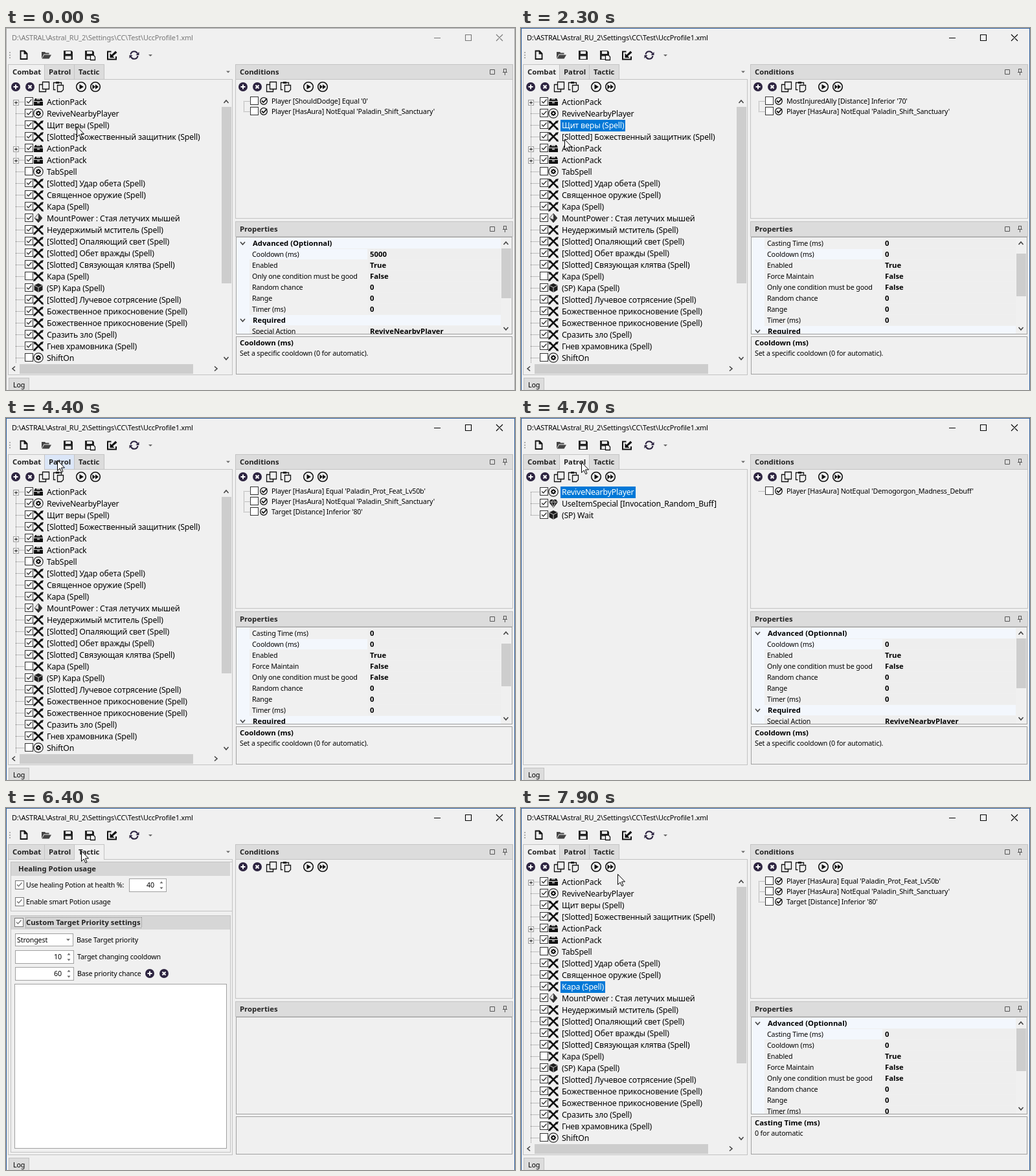
An HTML page with a canvas that plays this animation: 786 px wide and 560 px high, repeating every 8000 ms.

```html
<!DOCTYPE html>
<html lang="ru">
<head>
<meta charset="utf-8">
<title>Profile editor</title>
<style>
  html, body { margin: 0; width: 100%; height: 100%; overflow: hidden; background: #f0f0f0; }
  canvas { display: block; }
</style>
</head>
<body>
<canvas id="stage" width="786" height="560"></canvas>
<script>
const ctx = document.getElementById('stage').getContext('2d');
const BG = '#f0f0f0', BAR = '#dcdcdc', LINE = '#c3c3c3', EDGE = '#a0a0a0', INK = '#111', PLUM = '#2d2440';
const FAMILY = '"Noto Sans", "Open Sans", sans-serif';
const FONTS = {
  small: [`10.7px ${FAMILY}`, '-0.16px'],
  title: [`10.9px ${FAMILY}`, '-0.16px'],
  tree: [`12.3px ${FAMILY}`, '-0.17px'],
  bold: [`bold 11.3px ${FAMILY}`, '0px']
};

// First letter: row icon; a capital means unchecked.
const COMBAT = [
  'p ActionPack', 'g ReviveNearbyPlayer', 's Щит веры (Spell)',
  's [Slotted] Божественный защитник (Spell)', 'p ActionPack', 'p ActionPack', 'G TabSpell',
  's [Slotted] Удар обета (Spell)', 's Священное оружие (Spell)', 's Кара (Spell)',
  'm MountPower : Стая летучих мышей', 's Неудержимый мститель (Spell)',
  's [Slotted] Опаляющий свет (Spell)', 's [Slotted] Обет вражды (Spell)',
  's [Slotted] Связующая клятва (Spell)', 'S Кара (Spell)', 'c (SP) Кара (Spell)',
  's [Slotted] Лучевое сотрясение (Spell)', 's Божественное прикосновение (Spell)',
  's Божественное прикосновение (Spell)', 's Сразить зло (Spell)',
  's Гнев храмовника (Spell)', 'G ShiftOn'
];
const PATROL = ['g ReviveNearbyPlayer', 'd UseItemSpecial [Invocation_Random_Buff]', 'c (SP) Wait'];

const SANCTUARY = "Player [HasAura] NotEqual 'Paladin_Shift_Sanctuary'";
const CONDS = {
  revive: ["Player [ShouldDodge] Equal '0'", SANCTUARY],
  shield: ["MostInjuredAlly [Distance] Inferior '70'", SANCTUARY],
  smite: ["Player [HasAura] Equal 'Paladin_Prot_Feat_Lv50b'", SANCTUARY, "Target [Distance] Inferior '80'"],
  patrol: ["Player [HasAura] NotEqual 'Demogorgon_Madness_Debuff'"]
};

const actionProps = cooldown => [
  ['Advanced (Optionnal)'], ['Cooldown (ms)', cooldown], ['Enabled', 'True'],
  ['Only one condition must be good', 'False'], ['Random chance', '0'], ['Range', '0'],
  ['Timer (ms)', '0'], ['Required'], ['Special Action', 'ReviveNearbyPlayer']
];
const SPELL_PROPS = [
  ['Advanced (Optionnal)'], ['Casting Time (ms)', '0'], ['Cooldown (ms)', '0'], ['Enabled', 'True'],
  ['Force Maintain', 'False'], ['Only one condition must be good', 'False'], ['Random chance', '0'],
  ['Range', '0'], ['Timer (ms)', '0'], ['Required']
];
const COOLDOWN_HELP = ['Cooldown (ms)', 'Set a specific cooldown (0 for automatic).'];
const CASTING_HELP = ['Casting Time (ms)', '0 for automatic'];

const TABS = [['Combat', 4, 56], ['Patrol', 60, 46], ['Tactic', 106, 46]];

// Pointer moves: start ms, end ms, x, y
const MOVES = [
  [500, 600, 108, 152], [900, 1400, 67, 148], [2100, 2800, 69, 270], [3000, 3100, 69, 269],
  [3600, 4400, 79, 65], [4500, 5000, 120, 74], [5100, 5300, 124, 69], [6300, 6400, 116, 66],
  [6400, 7200, 24, 66], [7400, 7600, 28, 64], [7700, 7900, 149, 102]
];

function rect(x, y, w, h, color) {
  ctx.fillStyle = color;
  ctx.fillRect(x, y, w, h);
}
function box(x, y, w, h, fill, edge) {
  rect(x, y, w, h, edge);
  rect(x + 1, y + 1, w - 2, h - 2, fill);
}
function text(str, x, y, font = 'small', color = '#000', align = 'left') {
  [ctx.font, ctx.letterSpacing] = FONTS[font];
  ctx.fillStyle = color;
  ctx.textAlign = align;
  ctx.fillText(str, x, y);
}
function draw(d, x, y, fill, stroke, width = 1) {
  const path = new Path2D(d);
  ctx.save();
  ctx.translate(x, y);
  if (fill) { ctx.fillStyle = fill; ctx.fill(path); }
  if (stroke) { ctx.strokeStyle = stroke; ctx.lineWidth = width; ctx.stroke(path); }
  ctx.restore();
}
const ring = r => `M${-r} 0a${r} ${r} 0 1 0 ${2 * r} 0a${r} ${r} 0 1 0 ${-2 * r} 0Z`;
function dots(x, y, length, down) {
  for (let i = 0; i < length; i += 2) rect(down ? x : x + i, down ? y + i : y, 1, 1, '#888');
}
function clip(x, y, w, h, paint) {
  ctx.save();
  ctx.beginPath();
  ctx.rect(x, y, w, h);
  ctx.clip();
  paint();
  ctx.restore();
}

function checkbox(x, y, on, edge = '#333', size = 13) {
  box(x, y, size, size, '#fff', edge);
  if (on) draw('M3 6.5L5.5 9L10.5 3.5', x, y, null, edge, 1.4);
}
function badge(x, y, mark) {
  draw(ring(7), x, y, PLUM);
  draw(mark, x, y, null, '#fff', 2);
}
const addBadge = (x, y) => badge(x, y, 'M-3.5 0H3.5M0-3.5V3.5');
const removeBadge = (x, y) => badge(x, y, 'M-2.5-2.5L2.5 2.5M2.5-2.5L-2.5 2.5');

function listTools(x) {
  const y = 91;
  addBadge(x, y);
  removeBadge(x + 22, y);
  draw('M-2.5-7.5H7.5V3.5H-2.5ZM-2.5-3.5H-7.5V7.5H2.5V3.5', x + 44, y, null, INK, 1.3);
  draw('M-4.5 4.5H-7.5V-6.5H4.5V-3.5M-1.5-2.5H7.5V4.5L4.5 7.5H-1.5Z', x + 66, y, null, INK, 1.3);
  draw('M-4-8H1V-5H-4Z', x + 66, y, INK);
  draw(ring(7.3), x + 101, y, null, INK, 1.6);
  draw('M-2.5-4L4 0L-2.5 4Z', x + 101, y, INK);
  draw(ring(7.3), x + 123, y, null, INK, 1.6);
  draw('M-4.5-3.8L0 0L-4.5 3.8ZM0-3.8L5 0L0 3.8Z', x + 123, y, INK);
}

const ROW_ICONS = {
  p(x, y) {
    draw('M-5-5H5L7-1H-7ZM-7 0H7V6H-7Z', x, y, INK);
    draw('M-3-4H3M-2 1.5H2', x, y, null, '#ddd', 1.3);
  },
  g(x, y) {
    draw(ring(7.2), x, y, '#fafafa', '#222', 1.2);
    draw('M-4 0H4M0-4V4M-2.8-2.8L2.8 2.8M2.8-2.8L-2.8 2.8', x, y, null, INK, 1.8);
    draw(ring(2.2), x, y, '#fff', INK, 1.5);
  },
  s(x, y) {
    draw('M-5-5L6 6M5-5L-6 6', x, y, null, INK, 2.6);
    draw('M-8-7L-3-6L-6-2ZM8-7L3-6L6-2ZM4 7L7 4L8 8ZM-4 7L-7 4L-8 8Z', x, y, INK);
  },
  m(x, y) {
    draw('M0-7L6 0L0 7L-6 0Z', x, y, '#ddd', '#555');
    draw('M0-7L6 0L0 7ZM-6 0L0 2V7Z', x, y, '#333');
  },
  c(x, y) {
    draw('M0-7L6.5-4V3.5L0 7L-6.5 3.5V-4Z', x, y, '#1d1d1d');
    draw('M-6.5-4L0-.5L6.5-4M0-.5V7', x, y, null, '#ccc', 1);
  },
  d(x, y) {
    draw('M-4-6H4L7-2L0 7L-7-2Z', x, y, '#222');
    draw('M-7-2H7M-3-2L0 6L3-2L0-6Z', x, y, null, '#ccc', .9);
  }
};

const ARROWS = { up: 'M-3.5 2L0-2L3.5 2', down: 'M-3.5-2L0 2L3.5-2', left: 'M2-3.5L-2 0L2 3.5', right: 'M-2-3.5L2 0L-2 3.5' };
const arrow = (dir, x, y) => draw(ARROWS[dir], x, y, null, '#444', 1.6);
const caret = (x, y) => draw('M-3-1.5H3L0 1.5Z', x, y, '#666');

function tree(rows, selected, scrolls) {
  dots(15, 115, 18 * (rows.length - 1) + (scrolls ? 8 : 0), true);
  rows.forEach((row, i) => {
    const y = 114 + 18 * i, kind = row[0].toLowerCase(), label = row.slice(2);
    dots(15, y, 14);
    if (kind === 'p') {
      box(11, y - 3, 9, 9, '#fff', '#999');
      draw('M2 4.5H7M4.5 2V7', 11, y - 3, null, '#222');
    }
    checkbox(29, y - 7, row[0] === kind);
    ROW_ICONS[kind](50, y);
    if (i === selected) {
      [ctx.font, ctx.letterSpacing] = FONTS.tree;
      rect(61, y - 8, Math.round(ctx.measureText(label).width) + 4, 18, '#0078d7');
    }
    text(label, 63, y + 5, 'tree', i === selected ? '#fff' : '#000');
  });
  if (!scrolls) return;
  rect(4, 519, 345, 17, BG);
  rect(333, 122, 15, 273, '#cdcdcd');
  rect(21, 520, 268, 15, '#cdcdcd');
  arrow('up', 340, 114);
  arrow('down', 340, 511);
  arrow('left', 12, 527);
  arrow('right', 324, 527);
}

function spinner(x, y, w, value) {
  box(x, y, w, 21, '#fff', EDGE);
  text(value, x + w - 19, y + 14, 'small', '#000', 'right');
  draw('M-2.5 1.5H2.5L0-1.5Z', x + w - 8, y + 6, '#666');
  draw('M-2.5-1.5H2.5L0 1.5Z', x + w - 8, y + 15, '#666');
}

function tacticPage() {
  box(7, 83, 343, 77, BG, LINE);
  rect(8, 84, 338, 21, '#d6d6d6');
  text('Healing Potion usage', 19, 98, 'bold', '#222');
  checkbox(14, 112, true, '#777', 14);
  text('Use healing Potion at health %:', 31, 123);
  spinner(190, 109, 58, '40');
  checkbox(14, 138, true, '#777', 14);
  text('Enable smart Potion usage', 31, 149);

  box(7, 166, 340, 367, BG, LINE);
  rect(8, 167, 338, 21, '#d6d6d6');
  checkbox(13, 170, true, '#777', 14);
  text('Custom Target Priority settings', 31, 181, 'bold', '#222');
  dots(30, 169, 180);
  dots(30, 185, 180);
  dots(30, 169, 16, true);
  dots(209, 169, 16, true);
  box(14, 194, 90, 20, '#fff', EDGE);
  text('Strongest', 17, 208);
  caret(96, 204);
  text('Base Target priority', 109, 208);
  spinner(14, 220, 91, '10');
  text('Target changing cooldown', 110, 234);
  spinner(14, 246, 91, '60');
  text('Base priority chance', 110, 260);
  addBadge(222, 256);
  removeBadge(244, 256);
  box(13, 272, 328, 255, '#fff', EDGE);
}

function frameBar(active) {
  const edge = active ? '#2f5f9e' : '#aaa';
  rect(0, 0, 786, 1, edge);
  rect(0, 0, 1, 560, edge);
  rect(785, 0, 1, 560, edge);
  text('D:\\ASTRAL\\Astral_RU_2\\Settings\\CC\\Test\\UccProfile1.xml', 9, 19, 'title', active ? '#000' : '#777');
  draw('M661 15.5H671M709.5 10.5H718.5V19.5H709.5ZM757 10L767 20M767 10L757 20', 0, 0, null, active ? '#000' : '#777', 1.1);
}

function toolbar() {
  for (let y = 37; y < 49; y += 4) rect(5, y, 2, 2, '#aaa');
  draw('M-4.5-6H1.5L5.5-2V6.5H-4.5ZM1.5-6V-2H5.5', 27, 41.5, null, INK, 1.8);
  draw('M-7-5H-2L-.5-3.5H4.5V-1.5H-3.5L-7 5ZM-3-.5H8L4.5 5.5H-6.5Z', 62, 42, '#444');
  for (const x of [96, 129]) {
    draw('M-7-7H5L7-5V7H-7Z', x, 42, '#222');
    draw('M-4-6H4V-2H-4ZM-4.5 1.5H4.5V6H-4.5Z', x, 42, BG);
  }
  draw('M1.5 0H6L8.5 2.5V7.5H1.5Z', 129, 42, '#fff', INK, 1.3);
  draw('M-1-5.5H-6.5V6.5H6.5V2', 163.5, 42, null, INK, 2);
  draw('M-3-3V4H4L1.5 1.5L8-4L5.5-6.5L-.5-.5Z', 163.5, 42, INK);
  draw('M-5.5-1A5.5 5.5 0 0 1 5-2.5M5.5 1A5.5 5.5 0 0 1-5 2.5', 198, 42, null, PLUM, 2);
  draw('M7.5-5V0H2.5ZM-7.5 5V0H-2.5Z', 198, 42, PLUM);
  caret(223, 42.5);
}

function leftPane(s) {
  box(3, 79, 347, 458, BG, LINE);
  TABS.forEach(([name, x, w], i) => {
    const active = i === s.tab;
    const hover = !active && s.x >= x && s.x < x + w && s.y >= 57 && s.y < 79;
    box(x - 1, 56, w + 1, 24, active ? BG : hover ? '#dbe6f8' : BAR, LINE);
    if (active) rect(x, 78, w - 1, 2, BG);
    text(name, x + 6, 72, 'bold', '#222');
  });
  caret(343, 68);
  if (s.tab === 2) return tacticPage();
  listTools(15);
  clip(4, 80, 345, 456, () => tree(s.tab ? PATROL : COMBAT, s.selected, !s.tab));
}

function panelHead(title, y) {
  box(354, y, 429, 24, BAR, LINE);
  text(title, 361, y + 16, 'bold', '#222');
  draw('M747.5 8.5H754.5V15.5H747.5ZM768 7.5H773M768.5 8V12M772.5 8V12M767 12.5H774M770.5 13V17', 0, y, null, '#555');
}

function conditions(rows) {
  box(354, 56, 429, 239, BG, LINE);
  panelHead('Conditions', 56);
  listTools(366);
  dots(367, 113, 16 * (rows.length - 1), true);
  rows.forEach((row, i) => {
    const y = 113 + 16 * i;
    dots(367, y, 10);
    checkbox(377, y - 7, false);
    draw(ring(5.3), 398, y, null, INK, 1.3);
    draw('M-3-.5L-.5 2L5-4', 398, y, null, INK, 1.8);
    text(row, 410, y + 4);
  });
}

function properties({ props, scroll, help, thumb }) {
  panelHead('Properties', 299);
  box(355, 323, 427, 151, BG, EDGE);
  box(355, 477, 427, 59, BG, EDGE);
  if (!props) return;
  clip(356, 324, 425, 149, () => {
    rect(356, 324, 20, 149, '#f3f7fd');
    props.forEach(([name, value], i) => {
      const y = 333 + 17 * (i - scroll);
      if (value === undefined) {
        rect(356, y - 8, 408, 16, '#f3f7fd');
        arrow('down', 365.5, y);
        text(name, 381, y + 4, 'bold');
      } else {
        if (name === help[0]) rect(376, y - 8, 182, 16, '#f3f7fd');
        rect(559, y - 8, 205, 16, '#eee');
        text(name, 380, y + 4);
        text(value, 562, y + 4, 'bold');
      }
    });
    rect(764, 324, 17, 149, BG);
    rect(765, thumb[0], 15, thumb[1], '#cdcdcd');
    arrow('up', 772, 333);
    arrow('down', 772, 465);
  });
  text(help[0], 361, 491, 'bold');
  text(help[1], 361, 507);
}

function pointer(t) {
  let x = 109, y = 152;
  for (const [start, end, toX, toY] of MOVES) {
    const k = Math.min(1, Math.max(0, (t - start) / (end - start)));
    const ease = k * k * (3 - 2 * k);
    x += (toX - x) * ease;
    y += (toY - y) * ease;
  }
  return [Math.round(x), Math.round(y)];
}

function sceneAt(t) {
  const [x, y] = pointer(t);
  const s = { x, y, active: t >= 1900, tab: 0, selected: -1, conds: [], scroll: 0, help: COOLDOWN_HELP, thumb: [341, 77] };
  if (t < 4500) {
    if (t >= 1900 && t < 4400) s.selected = t < 3300 ? 2 : 9;
    s.conds = t < 2000 ? CONDS.revive : t < 3400 ? CONDS.shield : CONDS.smite;
    s.props = actionProps('5000');
    if (t >= 2000) Object.assign(s, { props: SPELL_PROPS, scroll: 1, thumb: [349, 66] });
  } else if (t < 5700) {
    Object.assign(s, { tab: 1, selected: t < 5600 ? 0 : -1, conds: CONDS.patrol, props: actionProps('0') });
  } else if (t < 7200) {
    s.tab = 2;
  } else {
    Object.assign(s, { selected: 9, conds: CONDS.smite, props: SPELL_PROPS, help: CASTING_HELP, thumb: [341, 66] });
  }
  return s;
}

function render(now) {
  const s = sceneAt(Math.floor(now % 8000 / 100) * 100);
  rect(0, 0, 786, 560, BG);
  frameBar(s.active);
  toolbar();
  leftPane(s);
  conditions(s.conds);
  properties(s);
  box(4, 541, 32, 20, BAR, LINE);
  text('Log', 11, 556);
  draw('M.5.5V16.5L4.2 13L6.8 18.8L9 17.8L6.5 12H11.5Z', s.x, s.y, '#fff', '#000');
  requestAnimationFrame(time => render(time - start));
}
const start = performance.now();
render(0);
</script>
</body>
</html>
```
